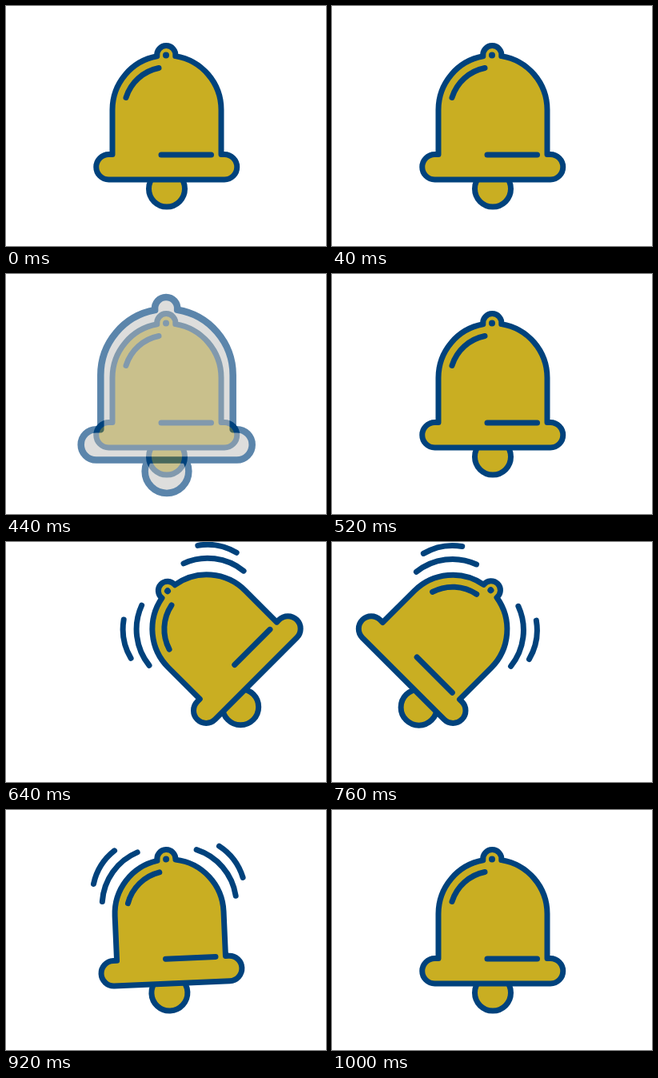
Write an HTML page that moves like this. It is 400 px wide and 300 px high and loops after 1520 ms.

```html
<!DOCTYPE html>
<html lang="en">
<head>
<meta charset="utf-8">
<title>Ringing bell</title>
<style>
  html, body { margin: 0; width: 100%; height: 100%; overflow: hidden; background: #fff; }
  svg { display: block; width: 100%; height: 100%; }
  .line { fill: none; }
</style>
</head>
<body>
<svg viewBox="0 0 400 300" stroke="#00427c" stroke-width="7" stroke-linecap="round" stroke-linejoin="round">
  <defs>
    <circle id="ball" cx="201" cy="228.5" r="22.5"/>
    <path id="body" d="M133 185.5V129.7A68 68 0 0 1 188.8 62.8A11.6 11.6 0 1 1 211.8 62.6A68 68 0 0 1 269 129.7V185.5H273A15.75 15.75 0 0 1 273 217H128.5A15.75 15.75 0 0 1 128.5 185.5Z"/>
  </defs>
  <g id="bell" fill="#c9ae22">
    <use id="clapper" href="#ball"/>
    <use href="#body"/>
    <circle cx="200" cy="61.5" r="4" fill="#00427c" stroke="none"/>
    <path class="line" d="M150 114.5A54 54 0 0 1 191 77.5M194 186H256.5"/>
    <path id="waves" class="line" d="M118 111A72 72 0 0 1 164.5 51.3M238.5 51.3A72 72 0 0 1 285 111M108.1 88.5A72 72 0 0 1 136 48M267 48A72 72 0 0 1 294.9 88.5"/>
  </g>
  <g id="pulse" fill="#cacbc9">
    <use href="#ball"/>
    <use href="#body"/>
  </g>
</svg>
<script>
  const LOOP = 1520, STEP = 40;
  const PULSE = { from: 320, to: 520, grow: 0.33 };
  const SWING = { from: 560, to: 1000 };
  // one entry per step: bell angle in degrees, clapper offset along the rim
  const angles = [0, -22.5, -45, -15, 15, 45, 15, -15, 3, -2.5, 1, 0];
  const offsets = [0, -20, -39, -13, 13, 39, 8, -23, 5, -4, 2, 0];

  const [bell, clapper, waves, pulse] =
    ['bell', 'clapper', 'waves', 'pulse'].map(id => document.getElementById(id));
  const show = (el, on) => el.setAttribute('visibility', on ? 'visible' : 'hidden');
  const within = (t, span) => t > span.from && t < span.to;

  function draw(t) {
    const swinging = within(t, SWING);
    const step = swinging ? (t - SWING.from) / STEP : 0;
    bell.setAttribute('transform', `rotate(${angles[step]} 200.7 59)`);
    clapper.setAttribute('transform', `translate(${offsets[step]} 0)`);
    show(waves, swinging);

    const pulsing = within(t, PULSE);
    show(pulse, pulsing);
    if (pulsing) {
      const p = (t - PULSE.from) / (PULSE.to - PULSE.from);
      const scale = 1 + PULSE.grow * (1 - Math.cos(Math.PI * p)) / 2;
      pulse.setAttribute('transform', `translate(201 145) scale(${scale}) translate(-201 -145)`);
      pulse.setAttribute('opacity', 1 - p * p);
    }
  }

  const start = performance.now();
  function tick(now) {
    const t = Math.max(0, now - start) % LOOP;
    draw(Math.floor(t / STEP) * STEP);
    requestAnimationFrame(tick);
  }
  draw(0);
  requestAnimationFrame(tick);
</script>
</body>
</html>
```
